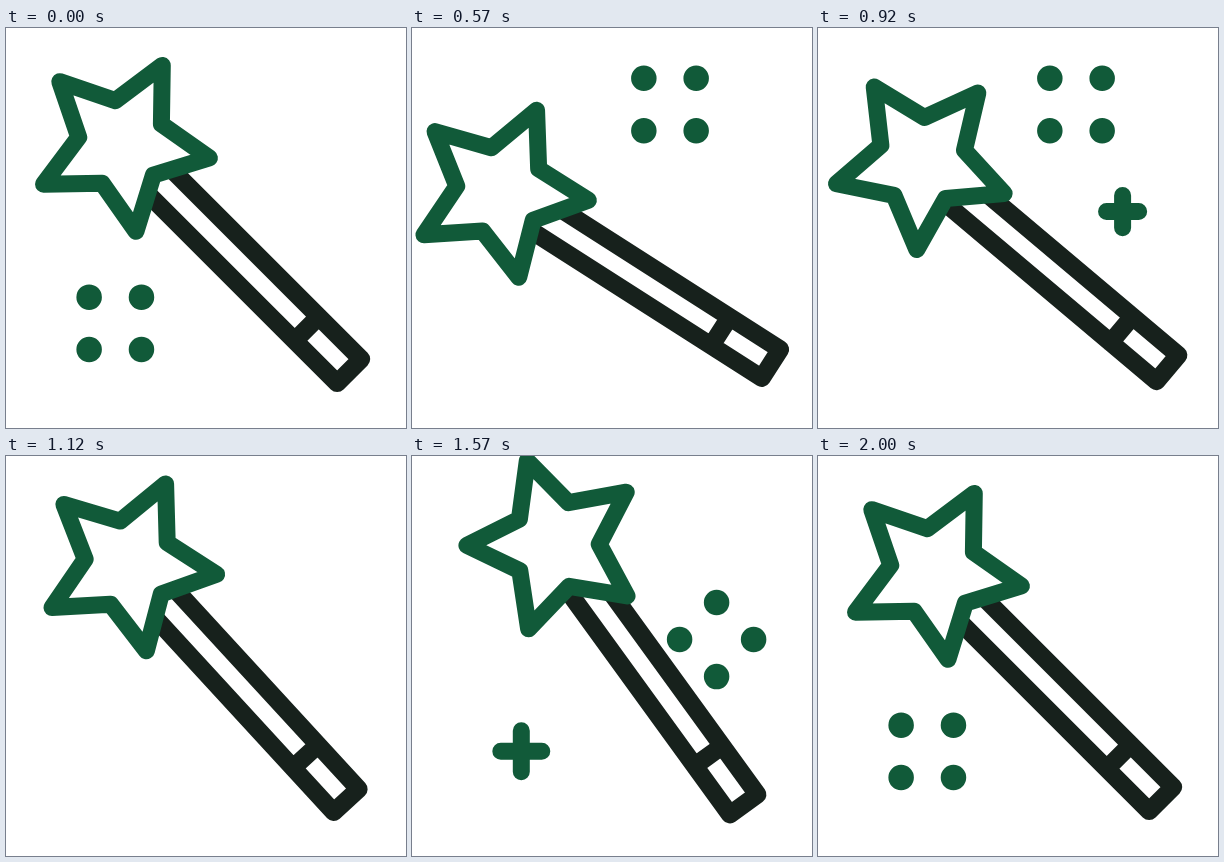
These frames come from a looping animation (400 by 400 pixels, 2020 ms). An HTML page:

```html
<!DOCTYPE html>
<html lang="en">
<head>
<meta charset="utf-8">
<title>Magic wand</title>
<style>
  html, body { margin: 0; height: 100%; overflow: hidden; background: #fff; }
  svg { display: block; width: 100vw; height: 100vh; }
  path { stroke-width: 17; stroke-linecap: round; stroke-linejoin: round; fill: #fff; }
  .shaft { stroke: #17211c; stroke-width: 18; }
  .magic { stroke: #115a39; }
</style>
</head>
<body>
<svg viewBox="0 0 400 400">
  <g id="sparks"></g>
  <g id="wand">
    <g transform="translate(116.2 116.1) rotate(45)">
      <path class="shaft" d="M25 -17H321V17H25ZM261 -17V17"/>
      <path id="star" class="magic"/>
    </g>
  </g>
</svg>
<script>
const LOOP = 2020, STEP = 25, LAST = 80;
const REACH = 37, BURST = 0.3;
const $ = id => document.getElementById(id);

// A burst starts at `burst`; four dots, turned by `turn`, show from `from` to `to` (seconds)
const sparks = [
  { x: 258, y: 76.5, burst: 0.033, from: 0.42, to: 1.12, turn: 45 },
  { x: 304.6, y: 183.6, burst: 0.795, from: 1.45, to: 1.8, turn: 0 },
  { x: 109.3, y: 295.3, burst: 1.409, from: 1.8, to: 2.15, turn: 45 }
];
for (const s of sparks) {
  s.el = document.createElementNS('http://www.w3.org/2000/svg', 'path');
  s.el.setAttribute('class', 'magic');
  $('sparks').append(s.el);
}

// Four rays from radius a to radius b
const rays = (a, b) => {
  b += 0.01;
  return `M${a} 0H${b}M${-a} 0H${-b}M0 ${a}V${b}M0 ${-a}V${-b}`;
};

function drawSpark({ el, x, y, burst, from, to, turn }, t) {
  const p = (t - burst) / BURST;
  const bursting = p > 0 && p < 1;
  const dots = (t >= from && t < to) || t + 2 < to;
  el.style.display = bursting || dots ? '' : 'none';
  el.style.strokeWidth = bursting ? 17 : 25.5;
  const tail = bursting ? REACH * (Math.max(0, p - 0.56) / 0.44) ** 2 : REACH;
  el.setAttribute('d', rays(tail, bursting ? REACH * p : REACH));
  el.setAttribute('transform', `translate(${x} ${y}) rotate(${bursting ? 0 : turn})`);
}

const corners = Array.from({ length: 10 }, (_, i) => {
  const r = i % 2 ? 88.3 : 44, angle = i * Math.PI / 5;
  return [r * Math.cos(angle), r * Math.sin(angle)];
});
$('star').setAttribute('d', 'M' + corners.join('L') + 'Z');

// Swing keys: [seconds, degrees]
const swing = [[0, 0], [0.46, -12.9], [1.55, 9.1], [2, 0]];
const ease = x => x < 0.5 ? 2 * x * x : 1 - 2 * (1 - x) ** 2;

function swingAt(t) {
  const i = Math.max(1, swing.findIndex(key => key[0] >= t));
  const [t0, v0] = swing[i - 1], [t1, v1] = swing[i];
  return v0 + (v1 - v0) * ease((t - t0) / (t1 - t0));
}

function spinAt(t) {
  const x = t / 2, w = 2 * Math.PI;
  return 360 * (x - 0.395 * Math.sin(w * x) / w);
}

function draw(now) {
  const t = Math.min(LAST, Math.floor((now % LOOP + 5) / STEP)) * STEP / 1000;
  const tilt = swingAt(t);
  // The wand turns about its handle end, which drifts along with the tilt
  $('wand').setAttribute('transform',
    `translate(${-1.27 * tilt} ${0.61 * tilt}) rotate(${tilt} 344 343)`);
  $('star').setAttribute('transform', `rotate(${spinAt(t)})`);
  for (const s of sparks) drawSpark(s, t);
}

const begin = performance.now();
function tick() {
  draw(performance.now() - begin);
  requestAnimationFrame(tick);
}
tick();
</script>
</body>
</html>
```
